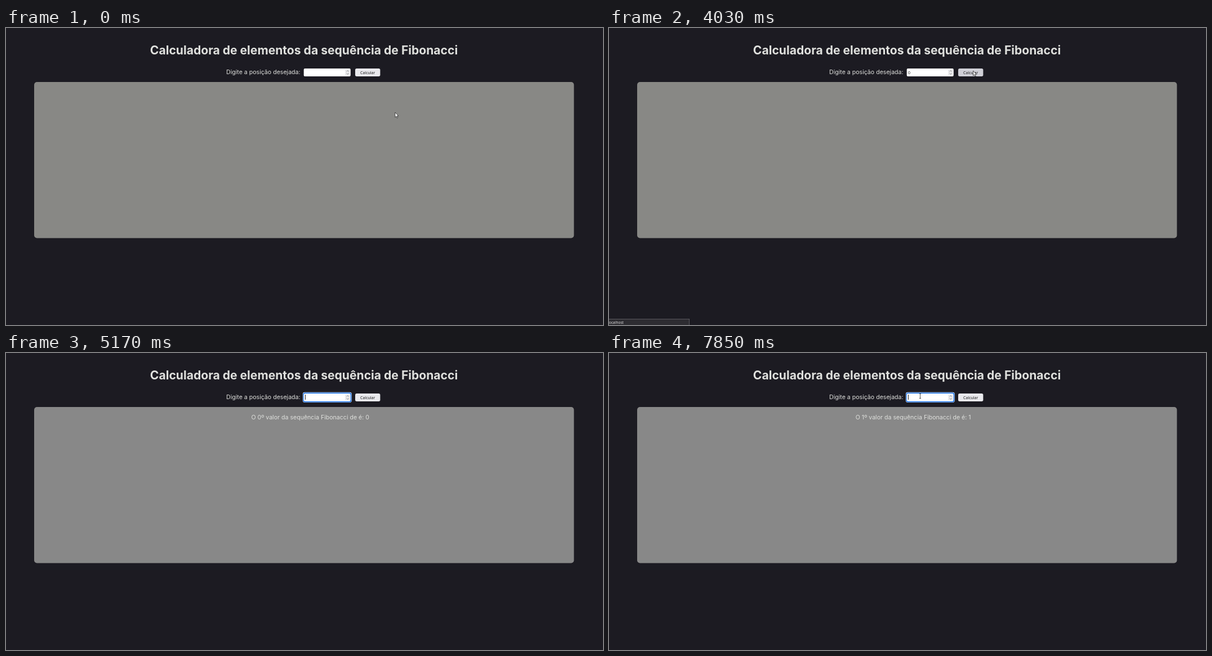
Animation, 1060 px wide and 528 px high, one loop 8000 ms. Source, as an HTML page:

```html
<!DOCTYPE html>
<html lang="pt">
<head>
<meta charset="utf-8">
<title>Calculadora</title>
<style>
  html, body { margin: 0; width: 100%; height: 100%; overflow: hidden; background: #1c1b22; }
  svg { display: block; width: 1060px; height: 528px; font-family: Inter, sans-serif; }
  #page { --bg: #1c1b22; --ink: #dfe0dd; }
  #page.flash { --bg: #191b1a; --ink: #e8e6e3; }
  #back { fill: var(--bg); }
  .copy { fill: var(--ink); font-size: 10.6px; }
  .title { font-size: 21.1px; font-weight: 700; }
  .mid { text-anchor: middle; }
  .ui { font: 7px "Open Sans", sans-serif; fill: #111; }
  .flash .box { display: none; }
  .flash #word { fill: var(--ink); }
  .chevron { fill: none; stroke: #777; stroke-width: .8; }
</style>
</head>
<body>
<svg id="page" viewBox="0 0 1060 528">
  <rect id="back" width="1060" height="528"/>
  <text class="copy title mid" x="529" y="47">Calculadora de elementos da sequência de Fibonacci</text>
  <text class="copy" x="391" y="81.6">Digite a posição desejada:</text>

  <g id="ring">
    <rect x="526.9" y="69.8" width="86.9" height="18.2" rx="3.4" fill="#fff"/>
    <rect x="527.5" y="70.4" width="85.7" height="17" rx="2.9" fill="#0060df"/>
  </g>
  <rect class="box" x="528.7" y="72" width="83.1" height="14" rx="2" fill="#fff"/>
  <rect x="602" y="74" width="9.4" height="10" rx="1" fill="#ebebed"/>
  <path class="chevron" d="M604.6 77.6l2.1-1.9 2.1 1.9M604.6 80.4l2.1 1.9 2.1-1.9"/>
  <text id="digit" class="ui" x="531" y="81.6"></text>
  <rect id="caret" y="74" width=".9" height="9" fill="#111"/>

  <rect id="button" class="box" x="620" y="72" width="44.4" height="14" rx="2.7"/>
  <text id="word" class="ui mid" x="642.2" y="81.5">Calcular</text>

  <rect id="panel" class="box" x="50" y="96" width="958.4" height="277.4" rx="5"/>
  <text id="result" class="copy mid" x="540.2" y="118.3"></text>

  <g id="status">
    <rect x="-1" y="517.4" width="143.6" height="12" fill="#2d2c31" stroke="#66656b" stroke-width=".8"/>
    <text class="ui" x="-1.7" y="526" style="font-size:6.6px;fill:#e6e6e6">localhost</text>
  </g>

  <path id="arrow" d="M.4 .5V9.2L2.3 7.4 3.7 10.6 5.1 10 3.7 6.9H6.3Z" fill="#fff" stroke="#111" stroke-width=".7"/>
  <path id="beam" d="M-1.6-4.2H1.6M0-4.2V4.2M-1.6 4.2H1.6" fill="none" stroke="#222" stroke-width=".8"/>
</svg>
<script>
const LOOP = 8000, TICK = 67.1;
const $ = id => document.getElementById(id);
const between = (t, a, b) => t >= a && t < b;

// Pointer: time, x, y
const path = [
  [0, 690.5, 149.5], [140, 642, 110], [210, 606, 88], [340, 576, 74.5],
  [470, 576, 74.5], [610, 579, 76.5], [1680, 579, 76.5],
  [1880, 627, 58.5], [2020, 693, 70], [2240, 761, 99], [2500, 713, 84],
  [2900, 686, 70], [3610, 680, 69.5], [3880, 648, 75.5], [4160, 644.5, 75.5],
  [4370, 591, 76.5], [4510, 553, 76.5], [5500, 553, 76.5],
  [5840, 684, 82], [6000, 718, 86], [6150, 718, 86], [6500, 668, 67],
  [6720, 648, 75], [6940, 647, 76], [7170, 604, 82], [7450, 552.5, 76.5], [LOOP, 552.5, 76.5]
];

function pointerAt(t) {
  const i = path.findIndex(p => p[0] > t);
  const [t0, x0, y0] = path[i - 1], [t1, x1, y1] = path[i];
  const k = (t - t0) / (t1 - t0);
  return [x0 + (x1 - x0) * k, y0 + (y1 - y0) * k];
}

// Focus, typing and submit times of each round
const rounds = [
  { focus: 1070, type: 3110, press: 3920, load: 4100, digit: "0" },
  { focus: 4840, type: 5780, press: 6780, load: 6980, digit: "1" },
  { focus: 7780, type: LOOP, press: LOOP, load: LOOP, digit: "" }
];

const show = (id, on) => $(id).setAttribute("visibility", on ? "visible" : "hidden");

function draw(t) {
  $("page").classList.toggle("flash", between(t, 4100, 4160));

  const round = rounds.find(r => between(t, r.focus, r.load));
  const focused = !!round && t < round.press;
  const typed = !!round && t >= round.type;
  show("ring", focused);
  $("digit").textContent = typed ? round.digit : "";
  const since = round ? t - (typed ? round.type : round.focus) : 0;
  show("caret", focused && since % 1040 < 530);
  $("caret").setAttribute("x", typed ? 535.2 : 531);

  const n = t < 6980 ? 0 : 1;
  $("result").textContent = t < 4100 ? "" : `O ${n}º valor da sequência Fibonacci de é: ${n}`;
  $("panel").setAttribute("fill", t < 4100 ? "#888885" : "#888888");
  show("status", between(t, 3970, 4160) || between(t, 6840, 6980));

  const [x, y] = pointerAt(Math.floor((t + 3) / TICK) * TICK);
  const hover = between(x, 620, 664.4) && between(y, 72, 86);
  const pressed = rounds.some(r => between(t, r.press, r.press + 70));
  $("button").setAttribute("fill", pressed ? "#b1b1b9" : hover ? "#d0d0d7" : "#e9e9ed");

  const overText = between(x, 529, 602) && between(y, 72, 86);
  const hidden = between(t, 5170, 5570);
  show("beam", overText && !hidden);
  show("arrow", !overText && !hidden);
  for (const id of ["beam", "arrow"]) $(id).setAttribute("transform", `translate(${x} ${y})`);
}

const start = performance.now();
function frame() {
  draw((performance.now() - start) % LOOP);
  requestAnimationFrame(frame);
}
frame();
</script>
</body>
</html>
```
